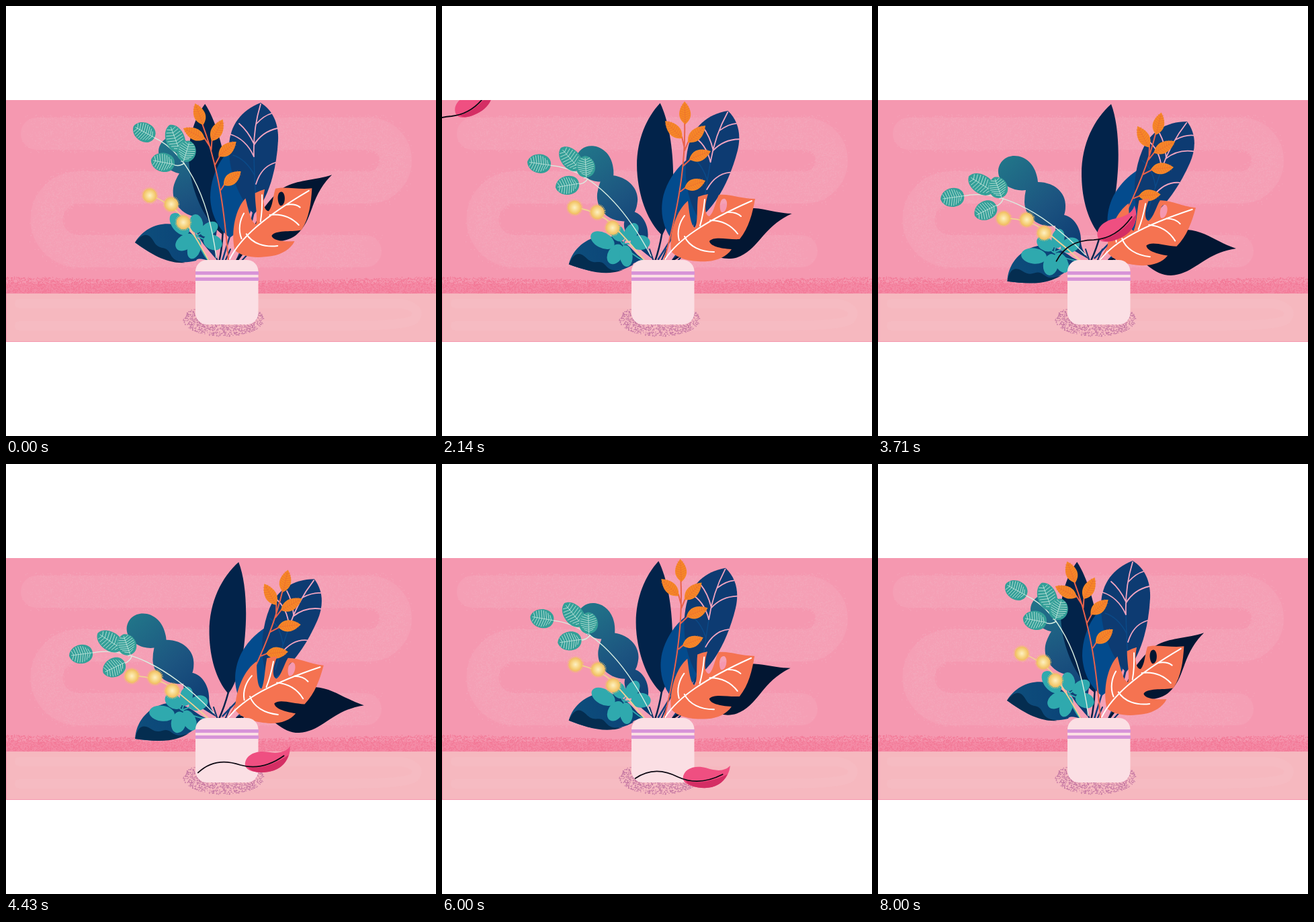
An HTML page for the animation above (8070 ms loop, 640 by 640 pixels).

```html
<!DOCTYPE html>
<html lang="en">
<head>
<meta charset="utf-8">
<title>Potted plant</title>
<style>
html,body{margin:0;width:100%;height:100%;overflow:hidden;background:#fff}
svg{display:block;width:100vw;height:100vh}
path,line{stroke-linecap:round}
</style>
</head>
<body>
<svg id="stage" viewBox="0 0 640 640">
  <defs>
    <clipPath id="band"><rect y="140" width="640" height="360"/></clipPath>
    <linearGradient id="lobes" x1="0" y1="0" x2=".8" y2="1">
      <stop stop-color="#22788a"/><stop offset=".55" stop-color="#1c5480"/><stop offset="1" stop-color="#0c3a72"/>
    </linearGradient>
    <linearGradient id="low"><stop stop-color="#0e4f7c"/><stop offset="1" stop-color="#0a4076"/></linearGradient>
    <radialGradient id="puff"><stop stop-color="#fdf0c4"/><stop offset=".5" stop-color="#f8d98a"/><stop offset="1" stop-color="#f0bc5e"/></radialGradient>
  </defs>
  <g clip-path="url(#band)" fill="none">
    <rect y="140" width="640" height="360" fill="#f598b0"/>
    <path id="brush" d="M46 190H540A40 40 0 0 1 540 270H108A47.5 47.5 0 0 0 108 365H535" stroke="#f59fb5" stroke-width="48"/>
    <path id="brushDots" stroke="#f4a9bc" stroke-width="1.1"/>
    <rect y="413" width="640" height="15" fill="#f48aa5"/>
    <path id="horizonDots" stroke="#f37997" stroke-width="1.4"/>
    <rect x="1" y="428" width="639" height="71" fill="#f6b8bf"/>
    <path d="M20 443H590Q620 450 608 466Q598 476 500 476H20" stroke="#f6bbc2" stroke-width="14"/>
    <path id="shadowDots" stroke="#c678a3" stroke-width="1.4"/>
    <g id="plants"></g>
    <rect x="282" y="378" width="93.5" height="96" rx="17" fill="#fbdfe4"/>
    <path d="M282 395h94v5h-94zM282 404h94v5h-94z" fill="#d794d8"/>
    <g id="petal">
      <path d="M357 466C358 452 375 446 392 451C408 456 420 455 427 447C425 470 405 484 380 480C365 478 357 473 357 466Z" fill="#ef4f81"/>
      <path d="M361 470C385 476 406 468 423 460C416 476 400 483 380 480C370 479 363 475 361 470Z" fill="#d42e64"/>
      <path d="M286 468C308 452 330 455 350 465C375 476 397 470 416 460" stroke="#0c0812" stroke-width="1.8"/>
    </g>
  </g>
</svg>
<script>
const LOOP = 8070, HALF = 4010;
const $ = id => document.getElementById(id);

let seed = 7;
const rand = () => (seed = seed * 16807 % 2147483647) / 2147483647;
const spread = () => rand() + rand() - 1;

function scatter(id, count, place) {
  let d = '';
  for (let i = 0; i < count; i++) {
    const [x, y] = place();
    d += `M${x.toFixed(1)} ${y.toFixed(1)}h.1`;
  }
  $(id).setAttribute('d', d);
}

const brush = $('brush'), brushLength = brush.getTotalLength();
scatter('brushDots', 15000, () => {
  const p = brush.getPointAtLength(rand() * brushLength);
  return [p.x + spread() * 28, p.y + (rand() * 2 - 1) * 26 + spread() * 5];
});
scatter('horizonDots', 4800, () => {
  const x = rand() * 640, rise = 17 + 7 * Math.abs(x - 320) / 320;
  return [x, 428 - rise * rand() - Math.abs(spread()) * 2];
});
scatter('shadowDots', 1500, () => {
  const a = rand() * Math.PI * 2, r = Math.sqrt(rand());
  return [324 + 60 * r * Math.cos(a), 467 + 25 * r * Math.sin(a)];
});

const fill = (d, color) => `<path d="${d}" fill="${color}" fill-rule="evenodd"/>`;
const line = (d, color, width = 2) => `<path d="${d}" stroke="${color}" stroke-width="${width}"/>`;
const oval = (x, y, rx, ry, turn, color) =>
  `<ellipse rx="${rx}" ry="${ry}" transform="translate(${x} ${y}) rotate(${turn})" fill="${color}"/>`;

// Veined leaf from its base to its tip; round leaves are widest further out.
function leaf(bx, by, tx, ty, width, color, vein, round) {
  const len = Math.hypot(tx - bx, ty - by), turn = Math.atan2(ty - by, tx - bx) * 180 / Math.PI;
  const w = width * .67, near = len * (round ? 0 : .25), far = len * (round ? .9 : .6);
  let veins = `M0 0H${len * .9}`;
  for (let i = 1; i < 9; i++) {
    const x = len * i / 10, reach = width * .43 * Math.sin(Math.PI * (i + 1) / 11);
    veins += `M${x + 3} ${-reach}L${x} 0L${x + 3} ${reach}`;
  }
  return `<g transform="translate(${bx} ${by}) rotate(${turn})">` +
    fill(`M0 0C${near} ${-w} ${far} ${-w} ${len} 0C${far} ${w} ${near} ${w} 0 0Z`, color) +
    line(veins, vein, round ? .8 : .5) + '</g>';
}

const orangeLeaf = (...p) => leaf(...p, 17, '#f68827', '#e76533', false);
const mintLeaf = (...p) => leaf(...p, 28, '#349f98', '#c4e6dd', true);
const puff = (x, y) => `<circle cx="${x}" cy="${y}" r="10.3" fill="url(#puff)"/>` +
  `<circle cx="${x}" cy="${y}" r="10.8" stroke="#f3c468" stroke-width="3" stroke-dasharray=".8 1.4" />`;

const NAVY = '#02234a', INK = '#021632', PINK = '#f3a5c0', TEAL = '#2fa9ae', RED = '#e9624b';

// Each part swings by "swing" degrees about (x, y); it is drawn for the pose at swing position "at".
const parts = [
  { x: 313, y: 375, swing: -19.3, at: .984, art:
    fill('M203 223C221 223 236 238 238 262C262 262 280 278 279 298Q279 306 277 311C292 314 303 332 302 350C302 358 306 368 314 377C295 366 280 358 270 345Q263 336 264 327C240 331 219 315 218 292Q218 282 220 274C200 277 178 263 179 245C180 232 190 223 203 223Z', 'url(#lobes)') },
  { x: 321, y: 378, swing: 12.7, at: .984, art:
    line('M331 340Q325 362 317 379', NAVY, 2.5) +
    fill('M347 146C357 172 360 215 356 257C353 295 343 327 331 342C312 320 303 285 303 250C303 205 322 168 347 146Z', NAVY) },
  { x: 330, y: 378, swing: 28, at: 0, art:
    line('M333 343L322 379', '#0b3f7c', 2.5) +
    fill('M340 208C318 225 304 255 304 285C305 315 320 335 333 345C355 330 372 300 373 265C372 240 358 220 340 208Z', '#034b8d') },
  { x: 344, y: 377, swing: 21.3, at: 0, art:
    line('M369 305Q362 340 344 378', '#0c3b72', 3) +
    fill('M379 144C398 156 406 176 405 200C403 240 392 285 369 310C345 285 331 245 332 208C333 178 350 155 379 144Z', '#0d3b72') +
    line('M369 224Q370 260 372 290M370 252Q357 228 338 222', '#0b4a88', 1.5) +
    line('M379 146C371 172 368 198 369 224M373 175Q384 163 395 160M369 207Q381 187 404 182M372 265Q380 239 401 233M369 205Q360 186 347 175M369 224Q357 198 334 191', PINK, 1.8) },
  { x: 344, y: 378, swing: 37.4, at: .984, art:
    line('M385 366L344 378', INK, 3) +
    fill('M533 361C505 352 488 335 460 333C425 335 400 348 375 365C395 378 410 401 436 401C472 399 484 368 533 361Z', INK) },
  { x: 330, y: 378, swing: 35, at: .55, art:
    line('M331 378C346 320 363 250 361 172M361 212L357 195M361 215L367 201M359 238L371 227M355 276L364 269', RED, 2) +
    orangeLeaf(362, 176, 361, 142) + orangeLeaf(357, 197, 332, 171) + orangeLeaf(366, 203, 392, 178) +
    orangeLeaf(368, 228, 400, 216) + orangeLeaf(361, 271, 392, 260) },
  { x: 308, y: 380, swing: -28.5, at: 0, art:
    fill('M192 352C204 331 228 321 250 325C276 329 287 352 294 366L304 380Q285 373 283 379C250 387 220 373 192 352Z', 'url(#low)') +
    fill('M192 352C203 338 212 337 219 349C228 366 238 355 244 368C249 379 256 380 267 382C238 384 215 368 192 352Z', '#042d50') },
  { x: 302, y: 380, swing: -46, at: .984, art:
    line('M302 380Q280 378 260 366M262 367L245 355M262 367L267 348M262 367L285 357', TEAL) +
    oval(232, 372, 19, 11.5, 7, TEAL) + oval(257, 385, 11, 16, 10, TEAL) + oval(273, 382, 9.5, 16, -26, TEAL) +
    oval(286, 356, 14.5, 11, -20, TEAL) + oval(268, 346, 9.5, 14.5, 12, TEAL) + oval(249, 354, 14, 10, 36, TEAL) },
  { x: 305, y: 379, swing: -37.3, at: .55, art:
    line('M160 237C210 240 265 285 311 372M212 256Q216 250 205 241M212 256L213 238M217 257Q212 265 202 265', '#d9eee2', 1.4) +
    mintLeaf(162, 237, 127, 232) + mintLeaf(205, 243, 177, 211) + mintLeaf(215, 255, 213, 223) + mintLeaf(204, 264, 169, 270) },
  { x: 302.5, y: 380, swing: -19.3, at: 0, art:
    line('M214 282Q250 294 268 322T302 379', '#f1d193', 1.8) + puff(214, 282) + puff(246, 295) + puff(264, 322) },
  { x: 329, y: 368, swing: 12.4, at: .55, art:
    fill('M466 287C445 287 428 279 412 281C407 291 405 307 398 313C390 311 391 295 396 280Q389 281 381 284C379 300 381 320 377 330C370 328 368 306 366 290C350 303 338 335 341 365C352 378 375 381 395 380C410 379 424 373 431 362C413 361 399 357 398 350C405 342 425 348 443 347C457 330 462 309 466 287ZM421 287C413 285 412 302 416 307C424 309 427 290 421 287Z', '#f57351') +
    line('M332 377C351 348 390 321 461 290M353 349C349 335 354 321 361 312M384 327C388 314 390 299 391 288M424 307Q438 306 445 313M399 319Q425 319 440 339M361 343C368 358 385 366 405 366', '#fff', 2) }
];

$('plants').innerHTML = '<path d="M350 380L362 367M344 380L354 366M315 380L309 362M326 380L334 362" stroke="#0a3568" stroke-width="2"/>' +
  parts.map(p => `<g>${p.art}</g>`).join('');
const nodes = $('plants').querySelectorAll(':scope > g');

// time, x, y, tilt of the drifting petal
const flight = [
  [1700, -36, 90, -30], [2140, 50, 142, -30], [3710, 358, 328, -27], [4290, 388, 418, -14],
  [4640, 392, 464, 0], [5950, 392.5, 466, 1], [6860, 567, 412, -18], [7950, 750, 395, -22]
];
const slope = (i, c) => (flight[i + 1][c] - flight[i][c]) / (flight[i + 1][0] - flight[i][0]);
function tangent(i, c) {
  if (i === 0) return slope(0, c);
  if (i === flight.length - 1) return slope(i - 1, c);
  const a = slope(i - 1, c), b = slope(i, c);
  return a * b <= 0 ? 0 : 2 * a * b / (a + b);
}
function flightAt(t, c) {
  const i = flight.findIndex((k, n) => n < flight.length - 1 && t < flight[n + 1][0]);
  const span = flight[i + 1][0] - flight[i][0], u = (t - flight[i][0]) / span;
  const ease = u * u * (3 - 2 * u);
  return flight[i][c] * (1 - ease) + flight[i + 1][c] * ease +
    span * u * (1 - u) * ((1 - u) * tangent(i, c) - u * tangent(i + 1, c));
}

function draw(t) {
  const u = Math.max(0, 1 - Math.abs(t - HALF) / HALF), swing = u * u * (3 - 2 * u);
  parts.forEach((p, i) =>
    nodes[i].setAttribute('transform', `rotate(${p.swing * (swing - p.at)} ${p.x} ${p.y})`));
  const flying = t >= flight[0][0] && t < flight.at(-1)[0];
  $('petal').style.display = flying ? '' : 'none';
  if (flying) {
    const [x, y, tilt] = [1, 2, 3].map(c => flightAt(t, c));
    $('petal').setAttribute('transform', `translate(${x} ${y}) rotate(${tilt}) translate(-392 -464)`);
  }
}

const start = performance.now();
function tick() {
  draw((performance.now() - start) % LOOP);
  requestAnimationFrame(tick);
}
draw(0);
requestAnimationFrame(tick);
</script>
</body>
</html>
```
